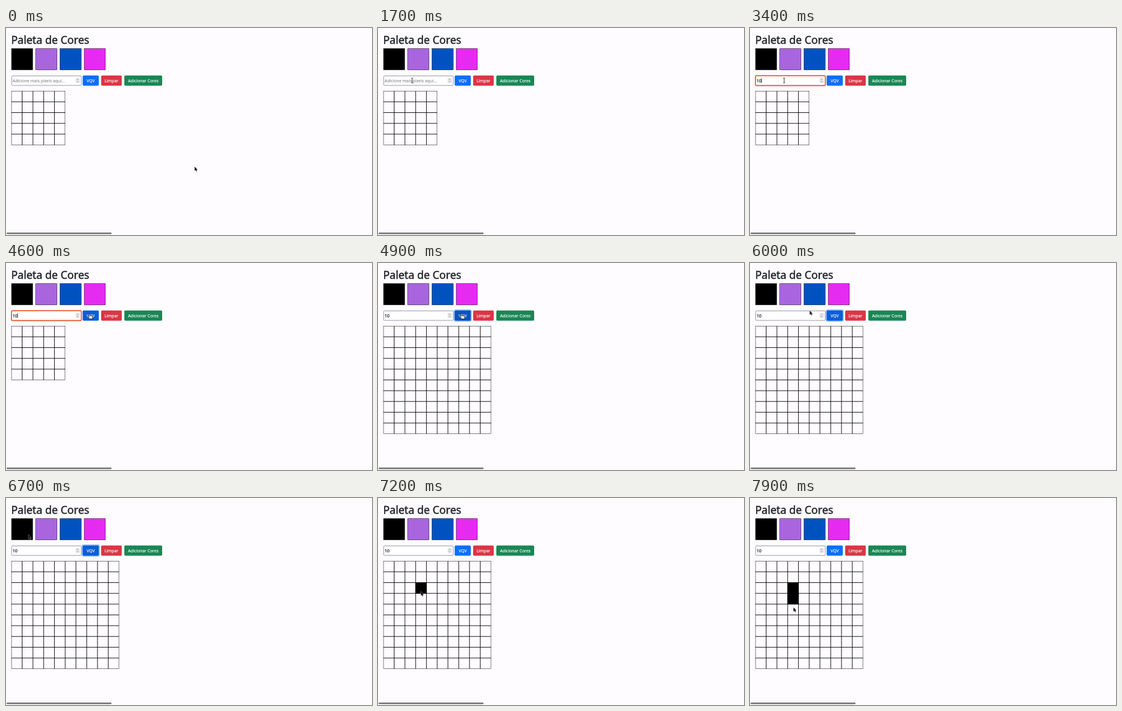
Animation of 600x339 px, one loop 8000 ms. Source, as an HTML page:

```html
<!DOCTYPE html>
<html lang="pt">
<head>
<meta charset="utf-8">
<title>Paleta de Cores</title>
<style>
html, body { margin: 0; width: 100%; height: 100%; overflow: hidden; background: #fefcff; }
svg { display: block; width: 100vw; height: 100vh; }
text { font-family: "Noto Sans", "Open Sans", sans-serif; font-size: 6.8px; }
.title { font-size: 17.6px; fill: #212529; stroke: #212529; stroke-width: .45px; }
.value { font-size: 7.06px; stroke: #000; stroke-width: .15px; }
.btn text { fill: #fff; stroke: #fff; stroke-width: .14px; text-anchor: middle; }
.line { fill: none; stroke: #000; stroke-width: .9px; }
.edge { fill: none; stroke: #000; stroke-width: .5px; }

.anim { animation: 8s step-end infinite; }
#hint { animation-name: hint; }
#one { animation-name: one; }
#zero { animation-name: zero; }
#caret { animation-name: caret; }
#focus { animation-name: focus; }
#go { animation-name: go; }
#ring { animation-name: ring; }
#small { animation-name: small; }
#big { animation-name: big; }
#ink1 { animation-name: ink1; }
#ink2 { animation-name: ink2; }
#pointer { animation-name: move; }
#arrow { animation-name: arrow; }
#beam { animation-name: beam; }
#hand { animation-name: hand; }

@keyframes hint { 0% { visibility: visible } 38.75%, 100% { visibility: hidden } }
@keyframes one { 0% { visibility: hidden } 38.75%, 100% { visibility: visible } }
@keyframes zero { 0% { visibility: hidden } 41.25%, 100% { visibility: visible } }
@keyframes small { 0% { visibility: visible } 61.25%, 100% { visibility: hidden } }
@keyframes big { 0% { visibility: hidden } 61.25%, 100% { visibility: visible } }
@keyframes ink1 { 0% { visibility: hidden } 90%, 100% { visibility: visible } }
@keyframes ink2 { 0% { visibility: hidden } 95%, 100% { visibility: visible } }
@keyframes focus {
  0%, 60%, 100% { visibility: hidden }
  26.25% { visibility: visible }
}
@keyframes caret {
  0% { transform: none; visibility: hidden }
  26.25% { transform: none; visibility: visible }
  38.75% { transform: translateX(4px); visibility: visible }
  41.25% { transform: translateX(8px); visibility: visible }
  60%, 100% { transform: none; visibility: hidden }
}
@keyframes go {
  0%, 85%, 100% { fill: #0d6efd }
  57.5%, 62.5% { fill: #0b5ed7 }
  60% { fill: #0a53be }
}
@keyframes ring {
  0%, 85%, 100% { visibility: hidden }
  60% { visibility: visible }
}
@keyframes arrow {
  0%, 75%, 100% { visibility: visible }
  21.25% { visibility: hidden }
}
@keyframes beam {
  0%, 57.5%, 75%, 100% { visibility: hidden }
  21.25%, 72.5% { visibility: visible }
}
@keyframes hand {
  0%, 72.5%, 100% { visibility: hidden }
  57.5% { visibility: visible }
}
/* the pointer advances ten times a second */
@keyframes move {
  0% { transform: translate(309px, 227px) }
  12.5% { transform: translate(309px, 227px); animation-timing-function: steps(4) }
  17.5% { transform: translate(115px, 118px); animation-timing-function: steps(3) }
  21.25% { transform: translate(56px, 86px) }
  50% { transform: translate(56px, 86px); animation-timing-function: steps(6) }
  57.5% { transform: translate(137px, 82.4px) }
  61.25% { transform: translate(137px, 82.4px); animation-timing-function: steps(6) }
  68.75% { transform: translate(145px, 90.3px); animation-timing-function: steps(3) }
  72.5% { transform: translate(122px, 85px); animation-timing-function: steps(7) }
  81.25% { transform: translate(36.5px, 60px) }
  85% { transform: translate(36.5px, 60px); animation-timing-function: steps(4) }
  90% { transform: translate(70px, 153px) }
  91.25% { transform: translate(70px, 153px); animation-timing-function: steps(2) }
  93.75% { transform: translate(70px, 163px) }
  95% { transform: translate(70px, 163px); animation-timing-function: steps(3) }
  98.75%, 100% { transform: translate(71px, 179px) }
}
</style>
</head>
<body>
<svg viewBox="0 0 600 339" preserveAspectRatio="none">
  <text class="title" x="8.4" y="26">Paleta de Cores</text>

  <g stroke="#000" stroke-width=".5">
    <rect x="9.05" y="33.75" width="34.8" height="34.8" fill="#000"/>
    <rect x="48.75" y="33.75" width="34.8" height="34.8" fill="#a865de"/>
    <rect x="88.45" y="33.75" width="34.8" height="34.8" fill="#0052c1"/>
    <rect x="128.15" y="33.75" width="34.8" height="34.8" fill="#e52bf1"/>
  </g>

  <rect x="9.3" y="78.4" width="114" height="15.6" rx="1.2" fill="#fff" stroke="#8f8f9c" stroke-width=".9"/>
  <rect id="focus" class="anim" x="9" y="78.1" width="114.6" height="16.2" rx="1.6" fill="none" stroke="#ee6238" stroke-width="1.7"/>
  <rect x="114" y="82" width="7" height="8" rx="1.5" fill="#e6e6ea"/>
  <path d="M116 85l1.5-1.5 1.5 1.5M116 87l1.5 1.5 1.5-1.5" fill="none" stroke="#8a8a90" stroke-width=".7"/>
  <text id="hint" class="anim" x="10.8" y="88.5" fill="#757575">Adicione mais pixels aqui...</text>
  <text class="value" x="10.8" y="88.5"><tspan id="one" class="anim">1</tspan><tspan id="zero" class="anim">0</tspan></text>
  <path id="caret" class="anim" d="M11 82v8" stroke="#000" stroke-width=".7"/>

  <g class="btn">
    <rect id="ring" class="anim" x="123.9" y="75.9" width="29.9" height="20.2" rx="3.5" fill="#98c1fe"/>
    <rect id="go" class="anim" x="125.7" y="77.65" width="26.4" height="16.76" rx="1.77" fill="#0d6efd"/>
    <text x="138.8" y="88.6">VQV</text>
    <rect x="156" y="77.65" width="33.8" height="16.76" rx="1.77" fill="#dc3545"/>
    <text x="172.8" y="88.6">Limpar</text>
    <rect x="194" y="77.65" width="62" height="16.76" rx="1.77" fill="#198754"/>
    <text x="225" y="88.6">Adicionar Cores</text>
  </g>

  <g id="small" class="anim"></g>
  <g id="big" class="anim"></g>
  <rect id="ink1" class="anim" x="61.5" y="138.3" width="18.2" height="18.1"/>
  <rect id="ink2" class="anim" x="61.5" y="156" width="18.2" height="18.1"/>

  <rect x="1" y="335" width="172" height="2.6" rx="1.3" fill="#707070"/>

  <g id="pointer" class="anim">
    <path id="arrow" class="anim" d="M.3 0v7l1.6-1.4 1.1 2.5 1.2-.6-1.1-2.3h2z" fill="#111" stroke="#fff" stroke-width=".6" paint-order="stroke"/>
    <path id="beam" class="anim" d="M-1.6-4h1.2l.4.4.4-.4h1.2M0-3.6v7.2M-1.6 4h1.2l.4-.4.4.4h1.2" fill="none" stroke="#222" stroke-width=".9"/>
    <path id="hand" class="anim" transform="scale(1.15)" d="M-.7.6q.7-1 1.4 0v2.6l3 .7q1 .3.9 1.3l-.5 2.8H0L-2.4 4.6q.4-1 1.7.2z" fill="#fff" stroke="#111" stroke-width=".75" stroke-linejoin="round"/>
  </g>
</svg>
<script>
const left = 8.82, top0 = 103.24, cell = 17.647;

function drawGrid(id, n) {
  const size = n * cell;
  let d = "";
  for (let i = 1; i < n; i++) {
    d += `M${left + i * cell} ${top0}v${size}M${left} ${top0 + i * cell}h${size}`;
  }
  document.getElementById(id).innerHTML =
    `<path class="line" d="${d}"/>` +
    `<rect class="edge" x="${left + 0.22}" y="${top0 + 0.22}" width="${size - 0.44}" height="${size - 0.44}"/>`;
}

drawGrid("small", 5);
drawGrid("big", 10);
</script>
</body>
</html>
```
